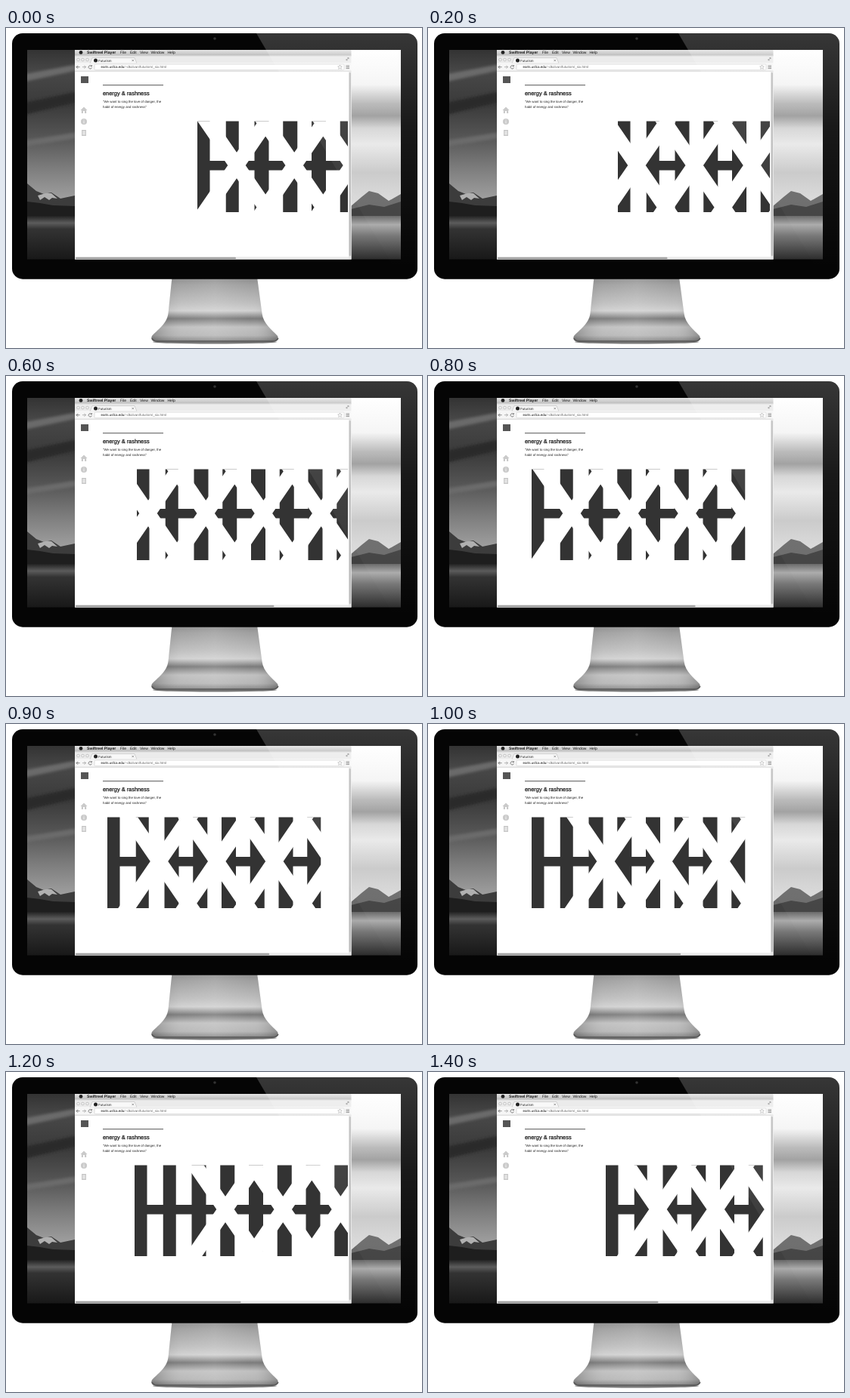
These frames come from a looping animation (550x424 px, 1500 ms). An HTML page:

```html
<!DOCTYPE html>
<html lang="en">
<head>
<meta charset="utf-8">
<title>energy &amp; rashness</title>
<style>
  html, body { margin: 0; width: 100%; height: 100%; overflow: hidden; background: #fff; }
  svg { display: block; width: 550px; height: 424px; }
  text { font-family: "Liberation Sans", Arial, sans-serif; text-rendering: geometricPrecision; }
</style>
</head>
<body>
<svg viewBox="0 0 550 424">
  <defs>
    <linearGradient id="skyL" x2="0" y2="1">
      <stop offset="0" stop-color="#333"/><stop offset=".14" stop-color="#484848"/>
      <stop offset=".35" stop-color="#3a3a3a"/><stop offset=".55" stop-color="#555"/>
      <stop offset=".75" stop-color="#7c7c7c"/><stop offset="1" stop-color="#a8a8a8"/>
    </linearGradient>
    <linearGradient id="skyR" x2="0" y2="1">
      <stop offset="0" stop-color="#fff"/><stop offset=".22" stop-color="#f4f4f4"/>
      <stop offset=".34" stop-color="#b4b4b4"/><stop offset=".42" stop-color="#999"/>
      <stop offset=".5" stop-color="#d4d4d4"/><stop offset=".6" stop-color="#e8e8e8"/>
      <stop offset=".78" stop-color="#c8c8c8"/><stop offset="1" stop-color="#dedede"/>
    </linearGradient>
    <linearGradient id="lakeL" x2="0" y2="1">
      <stop offset="0" stop-color="#222"/><stop offset=".16" stop-color="#5c5c5c"/>
      <stop offset=".3" stop-color="#333"/><stop offset="1" stop-color="#181818"/>
    </linearGradient>
    <linearGradient id="lakeR" x2="0" y2="1">
      <stop offset="0" stop-color="#666"/><stop offset=".2" stop-color="#aaa"/>
      <stop offset=".45" stop-color="#777"/><stop offset="1" stop-color="#2c2c2c"/>
    </linearGradient>
    <linearGradient id="bar" x2="0" y2="1">
      <stop offset="0" stop-color="#e4e4e4"/><stop offset="1" stop-color="#bdbdbd"/>
    </linearGradient>
    <linearGradient id="glare" x2="0" y2="1">
      <stop offset="0" stop-color="#fff" stop-opacity=".2"/><stop offset=".4" stop-color="#fff" stop-opacity=".08"/>
      <stop offset="1" stop-color="#fff" stop-opacity="0"/>
    </linearGradient>
    <linearGradient id="metal" x2="0" y2="1">
      <stop offset="0" stop-color="#858585"/><stop offset=".12" stop-color="#9c9c9c"/>
      <stop offset=".4" stop-color="#bcbcbc"/><stop offset=".52" stop-color="#cfcfcf"/>
      <stop offset=".64" stop-color="#757575"/><stop offset=".77" stop-color="#bebebe"/>
      <stop offset=".9" stop-color="#b4b4b4"/><stop offset="1" stop-color="#7c7c7c"/>
    </linearGradient>
    <linearGradient id="sheen">
      <stop offset="0" stop-color="#000" stop-opacity=".22"/><stop offset=".25" stop-color="#fff" stop-opacity=".08"/>
      <stop offset=".5" stop-color="#fff" stop-opacity=".16"/><stop offset=".78" stop-color="#fff" stop-opacity=".04"/>
      <stop offset="1" stop-color="#000" stop-opacity=".22"/>
    </linearGradient>
    <filter id="soft" x="-20%" y="-20%" width="140%" height="140%"><feGaussianBlur stdDeviation="4 1.8"/></filter>
    <clipPath id="body"><rect x="8" y="7" width="536" height="325.7" rx="14"/></clipPath>
    <clipPath id="screen"><rect x="28" y="29" width="494" height="277.5"/></clipPath>
    <clipPath id="art"><rect x="93" y="123.4" width="359" height="120.6"/></clipPath>
    <path id="stand" d="M219.5 330H332L338.5 378C340 392 352 400 359 408Q362 415 352 416H200Q190 415 193 408C200 400 213 392 214.5 378Z"/>
  </defs>

  <!-- stand -->
  <ellipse cx="276" cy="416" rx="82" ry="2.5" fill="#777"/>
  <use href="#stand" fill="url(#metal)"/>
  <use href="#stand" fill="url(#sheen)"/>
  <path d="M193 411Q195 415 200 415H352Q358 415 360 411" fill="none" stroke="#555" stroke-width="1.4"/>

  <!-- display and wallpaper -->
  <rect x="8" y="7" width="536" height="325.7" rx="14" fill="#050505"/>
  <circle cx="276" cy="14" r="1.8" fill="#333"/>
  <g clip-path="url(#screen)">
    <rect x="28" y="29" width="64" height="208" fill="url(#skyL)"/>
    <g filter="url(#soft)">
      <path d="M20 62L95 48V56L20 72ZM20 150L95 138V146L20 158Z" fill="#6a6a6a"/>
      <path d="M20 100L95 84V98L20 116Z" fill="#2a2a2a"/>
    </g>
    <path d="M28 206L40 216L50 220L60 218L72 226L91 222V250H28Z" fill="#3c3c3c"/>
    <path d="M42 222L52 219L60 219L68 226L61 225L57 228L51 224L45 228Z" fill="#b0b0b0"/>
    <path d="M28 230L45 232L62 235L91 236V251H28Z" fill="#1e1e1e"/>
    <rect x="28" y="249" width="64" height="58" fill="url(#lakeL)"/>
    <rect x="456" y="29" width="66" height="208" fill="url(#skyR)"/>
    <path d="M456 236L470 224L480 216L492 219L506 229L522 220V250H456Z" fill="#6a6a6a"/>
    <path d="M456 240L480 234L500 237L522 230V251H456Z" fill="#404040"/>
    <rect x="456" y="249" width="66" height="58" fill="url(#lakeR)"/>
  </g>

  <!-- browser -->
  <rect x="91" y="29" width="365.5" height="277.5" fill="#fff"/>
  <rect x="91" y="29" width="365.5" height="7.5" fill="url(#bar)"/>
  <circle cx="99" cy="32.4" r="2.4" fill="#222"/>
  <g font-size="5" fill="#111">
    <text x="107" y="34.2" font-size="5.15" font-weight="bold">Swiftreel Player</text>
    <text x="151" y="34.2">File</text><text x="164" y="34.2">Edit</text>
    <text x="177" y="34.2">View</text><text x="191.5" y="34.2">Window</text>
    <text x="213.5" y="34.2">Help</text>
  </g>
  <rect x="91" y="36.5" width="365.5" height="10" fill="#ebebeb"/>
  <path d="M91 36.8H456.5" stroke="#b5b5b5" stroke-width=".6"/>
  <g fill="#f2f2f2" stroke="#aaa" stroke-width=".6">
    <circle cx="95.5" cy="42" r="1.8"/><circle cx="101.5" cy="42" r="1.8"/><circle cx="107.5" cy="42" r="1.8"/>
  </g>
  <path d="M111 47L114 39.5H170L173 47Z" fill="#f8f8f8" stroke="#bbb" stroke-width=".6"/>
  <circle cx="118.5" cy="43" r="2.5" fill="#222"/>
  <text x="122" y="44.8" font-size="4.5" fill="#222">Futurism</text>
  <path d="M166.5 41.8l2.4 2.4m0-2.4l-2.4 2.4M450 42.5l3-3m-1.6 0h1.6v1.6m-3 0v1.6h1.6" fill="none" stroke="#777" stroke-width=".7"/>
  <rect x="91" y="46.5" width="365.5" height="10.5" fill="#f6f6f6"/>
  <path d="M91 57.2H456.5" stroke="#c0c0c0" stroke-width=".7"/>
  <rect x="117" y="48" width="330" height="7.6" rx="1.2" fill="#fff" stroke="#ccc" stroke-width=".6"/>
  <g fill="none" stroke="#777" stroke-width=".9">
    <path d="M97.5 51.7H93m2-2l-2 2l2 2"/>
    <path d="M101 51.7h4.5m-2-2l2 2l-2 2" stroke="#aaa"/>
    <path d="M113 50.4A2.2 2.2 0 1 0 113.4 52.6M113.4 49v1.8h-1.8"/>
    <path d="M449.5 50h4.5m-4.5 1.8h4.5m-4.5 1.8h4.5"/>
  </g>
  <path d="M441.5 49l.8 1.8 2 .2-1.5 1.3.5 2-1.8-1-1.8 1 .5-2-1.5-1.3 2-.2Z" fill="none" stroke="#888" stroke-width=".5"/>
  <text x="125.5" y="53.4" font-size="4.5" fill="#111">earts.usfca.edu<tspan fill="#666">/~dkolvan/futurism/_six.html</tspan></text>

  <!-- page -->
  <rect x="99" y="64" width="10" height="9" fill="#555"/>
  <g fill="#cacaca">
    <path d="M98.5 109L103 104.5L107.5 109H106.2V113H104V110H102V113H99.8V109Z"/>
    <circle cx="103" cy="124" r="4"/>
    <path d="M100 135H106V143H100Z"/>
    <path d="M103 121.3v1.1m0 .8v3.2M101.2 137.3h3.6m-3.6 1.7h3.6m-3.6 1.7h3.6" stroke="#fff" stroke-width=".8"/>
  </g>
  <path d="M128 75.7H208" stroke="#555" stroke-width="1"/>
  <text x="128" y="88.8" font-size="7.4" fill="#222" stroke="#222" stroke-width=".28">energy &amp; rashness</text>
  <g font-size="4.38" fill="#222">
    <text x="128" y="98.6">"We want to sing the love of danger, the</text>
    <text x="128" y="105.7">habit of energy and rashness"</text>
  </g>

  <g clip-path="url(#art)">
    <path id="posts" fill="#333"/>
    <path id="crosses" fill="none" stroke="#fff" stroke-width="19.4"/>
  </g>

  <!-- scrollbars -->
  <rect x="453" y="57.5" width="3.5" height="249" fill="#e6e6e6"/>
  <rect x="453.7" y="59" width="2.2" height="243" rx="1.1" fill="#bcbcbc"/>
  <rect x="91" y="303.2" width="362" height="3.3" fill="#ececec"/>
  <rect id="thumb" x="92" y="303.8" height="2.2" rx="1.1" fill="#a2a2a2"/>

  <path d="M331 7H544V317H513Z" fill="url(#glare)" clip-path="url(#body)"/>
</svg>
<script>
const el = id => document.getElementById(id);
const STEP = 100, PITCH = 37.75, PERIOD = 76.2, MID = 182, SLOPE = 1.46;

// left edge of the posts and centre of the first cross, one entry per step
const postX = [253, 255, 251, 244, 229, 204, 173, 149, 137, 134, 137, 148, 170, 203, 235];
const crossX = [305, 295, 276, 243, 207.5, 194, 188, 186, 190, 202.5, 235, 269, 290, 300, 304];
const widths = [16.5, 17, 19, 19, 19, 19, 19, 18];

const rect = (x, y, w, h) => `M${x} ${y}h${w}v${h}h${-w}Z`;

function cross(x) {
  const dy = 80, dx = dy / SLOPE;
  return `M${x - dx} ${MID - dy}L${x + dx} ${MID + dy}M${x + dx} ${MID - dy}L${x - dx} ${MID + dy}`;
}

el("posts").setAttribute("d",
  widths.map((w, i) => rect(i * PITCH, 123, w, 121)).join("") + rect(0, 176, 282, 12.4));
el("crosses").setAttribute("d",
  Array.from({ length: 5 }, (_, i) => cross(i * PERIOD)).join(""));

const start = performance.now();
function draw(now) {
  const i = Math.floor(Math.max(0, now - start) / STEP) % postX.length;
  el("posts").setAttribute("transform", `translate(${postX[i]})`);
  el("crosses").setAttribute("transform", `translate(${crossX[i]})`);
  el("thumb").setAttribute("width", 212 + (305 - crossX[i]) / 2.32);
  requestAnimationFrame(draw);
}
draw(start);
</script>
</body>
</html>
```
